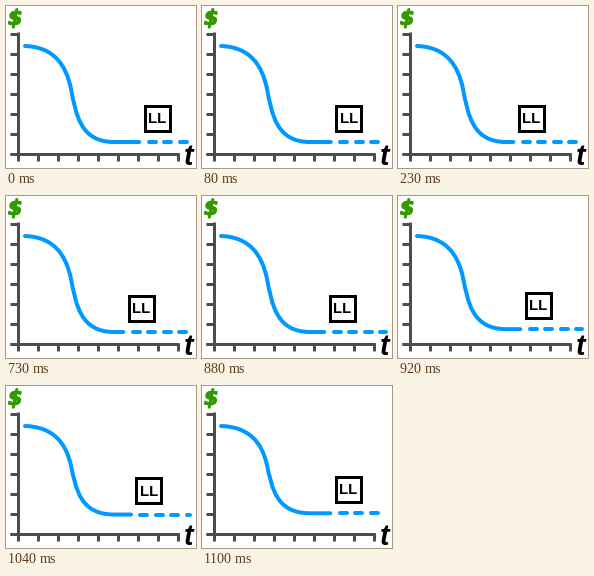
Write a matplotlib script that moves like this. It is 190 px wide and 162 px high and loops after 6100 ms.

```python
import numpy as np
import matplotlib.pyplot as plt
from matplotlib.animation import FuncAnimation
from matplotlib.patches import PathPatch, Rectangle
from matplotlib.path import Path
from matplotlib.patheffects import withStroke

W, H, DPI = 190, 162, 100
LOOP, STEP = 6100, 10
PX = 72 / DPI
BLUE, GRAY, GREEN = "#0099ff", "#4d4d4d", "#339900"
TOP, FLOOR = 40, 136
DASH, PERIOD, DASH_END = 7, 15.5, 184.3

# moments at which the picture advances, in ms: two bursts with a rest between
TICKS = np.round(np.r_[0, np.linspace(20, 230, 10),
                       730, np.linspace(830, 1100, 13)], -1)

fig = plt.figure(figsize=(W / DPI, H / DPI), dpi=DPI, facecolor="white")
ax = fig.add_axes([0, 0, 1, 1])
ax.set_xlim(0, W)
ax.set_ylim(H, 0)
ax.axis("off")


def line(xs, ys, color=GRAY, width=3, cap="butt"):
    return ax.plot(xs, ys, color=color, lw=width * PX,
                   solid_capstyle=cap)[0]


def label(x, y, text, size, color="black", **font):
    return ax.text(x, y, text, fontsize=size * PX, color=color, ha="center",
                   va="baseline", weight="bold", parse_math=False, **font)


# axes with tick marks
line([11.5, 11.5], [26, 149])
line([4, 173], [147.5, 147.5])
for k in range(9):
    line([11.5 + 20 * k] * 2, [147, 155])
for k in range(7):
    line([4, 12], [27.5 + 20 * k] * 2)

dollar = label(9.2, 18.8, "$", 21, GREEN, family="DejaVu Sans",
               style="oblique")
dollar.set_path_effects([withStroke(linewidth=1.2 * PX, foreground=GREEN)])
label(182.7, 159, "t", 28.5, family="Liberation Sans", style="italic")

CURVE = [(19, 40), (47, 41), (60, 58), (65, 83),
         (70, 108), (74, FLOOR), (108, FLOOR)]
CODES = [Path.MOVETO] + [Path.CURVE4] * 6 + [Path.LINETO]

curve = PathPatch(Path([(0, 0)] * len(CODES), CODES), fill=False, ec=BLUE,
                  lw=4 * PX, capstyle="round", joinstyle="round")
ax.add_patch(curve)
dashes = [line([], [], BLUE, 4, "round") for _ in range(5)]
box = Rectangle((0, 0), 25, 25, fc="white", ec="black", lw=3 * PX,
                joinstyle="miter", zorder=4)
ax.add_patch(box)
name = label(0, 0, "LL", 15, family="Liberation Sans", zorder=5)


def pose(ms):
    """Box position and height gained by the flat part of the curve."""
    t = TICKS[TICKS <= ms][-1]
    x = np.interp(t, [0, 140, 230, 730, 880, 970, 1100],
                  [152, 143, 134, 136, 141, 141, 147])
    rise = np.interp(t, [880, 970, 1100], [0, 6.4, 8.7])
    return x, rise


def draw(i):
    x, rise = pose(i * STEP)
    floor = FLOOR - rise
    scale = (floor - TOP) / (FLOOR - TOP)
    pts = [(px, TOP + (py - TOP) * scale) for px, py in CURVE]
    curve.set_path(Path(pts + [(x - 18.7, floor)], CODES))
    for k, dash in enumerate(dashes):
        a = x - 9.5 + PERIOD * k
        b = min(a + DASH, DASH_END)
        dash.set_data([a, b], [floor, floor])
        dash.set_visible(a < b)
    box.set_xy((x - 13.5, floor - 36.5))
    name.set_position((x - 0.8, floor - 19))
    return [curve, box, name, *dashes]


anim = FuncAnimation(fig, draw, frames=LOOP // STEP, interval=STEP,
                     repeat=True, repeat_delay=0, blit=False)
plt.show()
```
